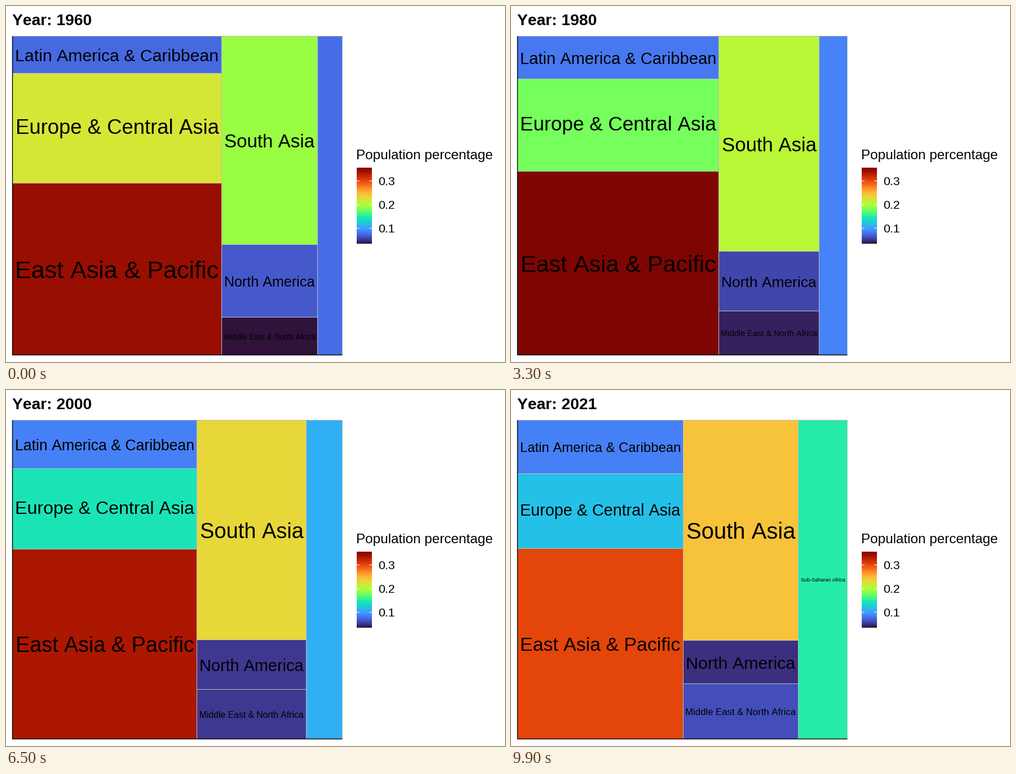
Recreate the animation shown at these times as a matplotlib script. Size 885 px wide and 632 px high, loop 10000 ms.

```python
import matplotlib.pyplot as plt
import numpy as np
from matplotlib.animation import FuncAnimation
from matplotlib.colors import Normalize
from matplotlib.patches import Rectangle

W, H, DPI = 885, 632, 100
PX = 72 / DPI  # points per pixel
FRAMES, INTERVAL = 100, 100
FIRST, LAST = 1960, 2021
LEFT, RIGHT, TOP, BOTTOM = 11.5, 596.5, 53.5, 619.5
PADDING, MIN_SIZE = 7.4, 7.35

plt.rcParams["font.family"] = "Liberation Sans"
plt.rcParams["text.kerning_factor"] = 6

# Population shares in four years, joined by a cubic; one list per column
YEARS = [1960, 1975, 2000, 2021]
COLUMNS = [
    [("Latin America & Caribbean", [0.0736, 0.0798, 0.0853, 0.0847]),
     ("Europe & Central Asia", [0.2185, 0.1879, 0.1409, 0.1173]),
     ("East Asia & Pacific", [0.3418, 0.3528, 0.3324, 0.3002])],
    [("South Asia", [0.1901, 0.1990, 0.2293, 0.2416]),
     ("North America", [0.0659, 0.0592, 0.0517, 0.0473]),
     ("Middle East & North Africa", [0.0345, 0.0393, 0.0515, 0.0607])],
    [("Sub-Saharan Africa", [0.0756, 0.0821, 0.1089, 0.1482])],
]

cmap = plt.get_cmap("turbo")
norm = Normalize(0.0344, 0.3535, clip=True)

fig = plt.figure(figsize=(W / DPI, H / DPI), dpi=DPI, facecolor="white")
ax = fig.add_axes([0, 0, 1, 1])
ax.axis("off")


def label(x, y, s, size, **kw):
    return ax.text(x, y, s, fontsize=size * PX, va="baseline", color="black", **kw)


def line(xs, ys, color, width):
    ax.plot(xs, ys, color=color, lw=width * PX, zorder=4,
            solid_capstyle="butt", snap=False)


def pixel(v):
    """Centre of the pixel that holds v."""
    return np.floor(v) + 0.5


# Legend
BAR_L, BAR_R, BAR_T, BAR_B = 622, 649, 287, 422
ax.imshow(np.linspace(1, 0, 300)[:, None], cmap=cmap, aspect="auto",
          extent=(BAR_L, BAR_R, BAR_B, BAR_T), interpolation="bilinear")
label(621, 272, "Population percentage", 24.2)
for value in (0.1, 0.2, 0.3):
    y = pixel(BAR_B + (BAR_T - BAR_B) * norm(value) + 0.5)
    for a, b in ((BAR_L, BAR_L + 5), (BAR_R - 5, BAR_R)):
        line([a, b], [y, y], "white", 1)
    label(660, y + 8, f"{value:.1f}", 21.3)

ax.set_xlim(0, W)
ax.set_ylim(H, 0)

# Panel axes
line([LEFT, LEFT, RIGHT], [TOP, BOTTOM, BOTTOM], "black", 1.4)
title = label(11, 34, "", 28.2, weight="bold")


def em_width(text):
    """Width of a label in units of its font size."""
    text.set_fontsize(100 * PX)
    return text.get_window_extent(fig.canvas.get_renderer()).width / 100 + 0.07


class Tile:
    def __init__(self, name, shares):
        self.curve = np.polynomial.Polynomial.fit(YEARS, shares, 3)
        self.box = ax.add_patch(Rectangle((0, 0), 1, 1, ec="#bebebe", lw=PX,
                                          zorder=2, snap=False))
        self.text = label(0, 0, name, 10, ha="center", zorder=5)
        self.em = em_width(self.text)
        # Centre on the inked height, which a descender extends downwards
        self.drop = 0.26 if "p" in name else 0.365

    def place(self, share, x0, x1, y0, y1):
        self.box.set_bounds(x0, y0, x1 - x0, y1 - y0)
        self.box.set_facecolor(cmap(norm(share)))
        size = (x1 - x0 - PADDING) / self.em
        self.text.set_fontsize(size * PX)
        self.text.set_position(((x0 + x1) / 2, (y0 + y1) / 2 + self.drop * size + 0.6))
        self.text.set_visible(size > MIN_SIZE)


columns = [[Tile(*region) for region in column] for column in COLUMNS]


def edges(start, end, parts):
    """Split start..end in proportion to parts, on whole pixels."""
    cuts = np.concatenate([[0], np.cumsum(parts)]) / np.sum(parts)
    return pixel(start + (end - start) * cuts + 1e-6)


def update(i):
    year = FIRST + (LAST - FIRST) * i / (FRAMES - 1)
    title.set_text(f"Year: {round(year)}")
    shares = [[tile.curve(year) for tile in column] for column in columns]
    xs = edges(LEFT, RIGHT, [sum(s) for s in shares])
    for column, part, x0, x1 in zip(columns, shares, xs, xs[1:]):
        ys = edges(TOP, BOTTOM, part)
        for tile, share, y0, y1 in zip(column, part, ys, ys[1:]):
            tile.place(share, x0, x1, y0, y1)


anim = FuncAnimation(fig, update, frames=FRAMES, interval=INTERVAL,
                     repeat=True, repeat_delay=0, blit=False)
plt.show()
```
